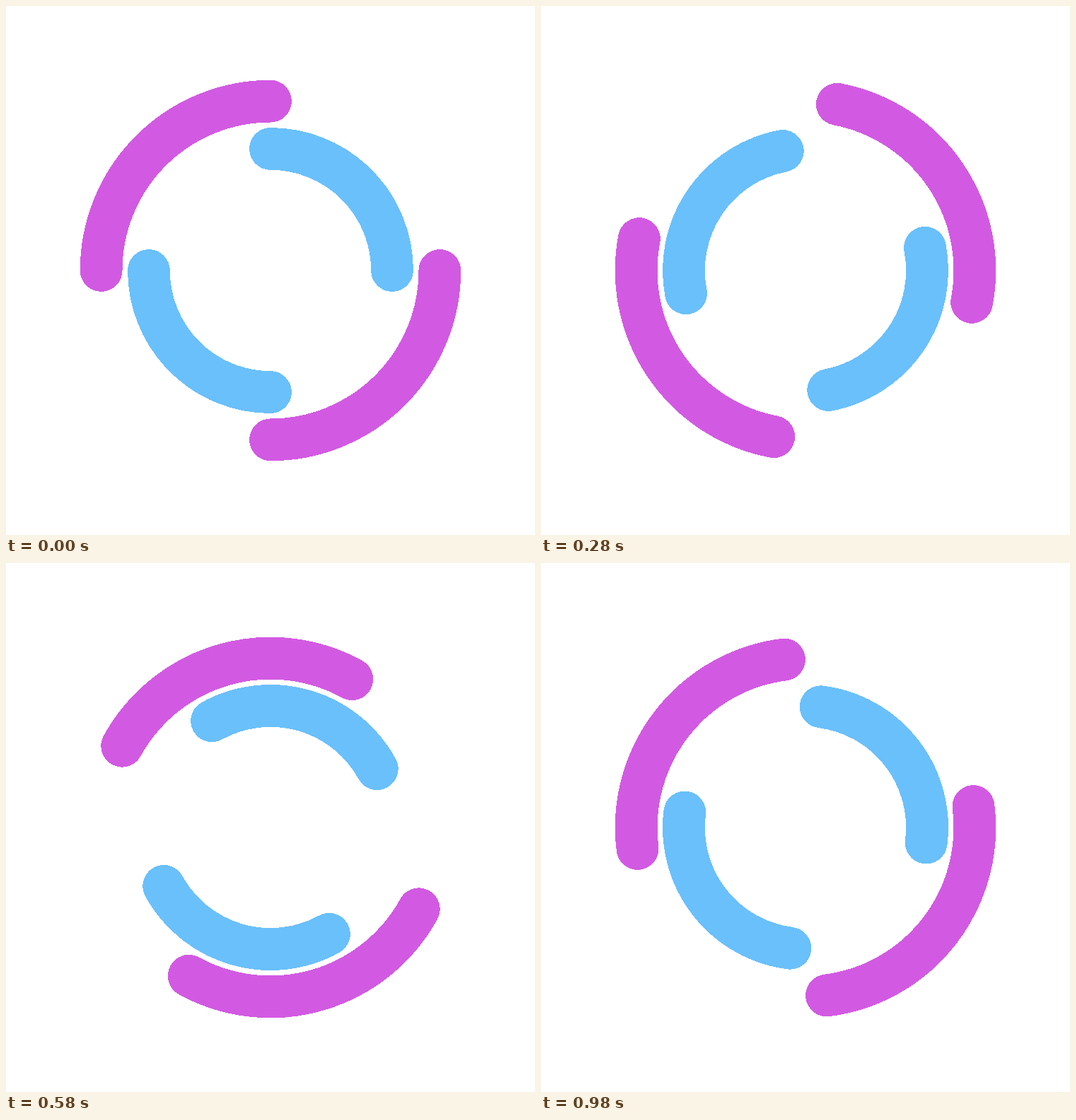
Write an HTML page that moves like this. It is 748 px wide and 748 px high and loops after 1 s.

```html
<!DOCTYPE html>
<html lang="en">
<head>
<meta charset="utf-8">
<title>Dual ring spinner</title>
<style>
  html, body { margin: 0; width: 100%; height: 100%; overflow: hidden; background: #fff; }
  svg { display: block; width: 100vw; height: 100vh; }
  path { fill: none; stroke-width: 59.84; stroke-linecap: round; shape-rendering: crispEdges; }
</style>
</head>
<body>
<svg viewBox="-374 -374 748 748">
  <!-- quarter arcs in opposite corners -->
  <path id="outer" stroke="#d25ae2"
    d="M-239.36 0A239.36 239.36 0 0 1 0 -239.36M239.36 0A239.36 239.36 0 0 1 0 239.36"/>
  <path id="inner" stroke="#6ac0fb"
    d="M0 -172.04A172.04 172.04 0 0 1 172.04 0M0 172.04A172.04 172.04 0 0 1 -172.04 0"/>
</svg>
<script>
  const LOOP = 1000, STEP = 20, SLACK = 4;
  const outer = document.getElementById("outer");
  const inner = document.getElementById("inner");
  const start = performance.now();

  const spin = (ring, deg) => ring.setAttribute("transform", `rotate(${deg})`);

  // The rings turn once per loop in opposite directions, in 20 ms steps.
  function draw(ms) {
    const t = Math.floor((ms + SLACK) / STEP) * STEP % LOOP;
    const deg = t / LOOP * 360;
    spin(outer, deg);
    spin(inner, -deg);
  }

  function tick() {
    draw(performance.now() - start);
    requestAnimationFrame(tick);
  }
  tick();
</script>
</body>
</html>
```
